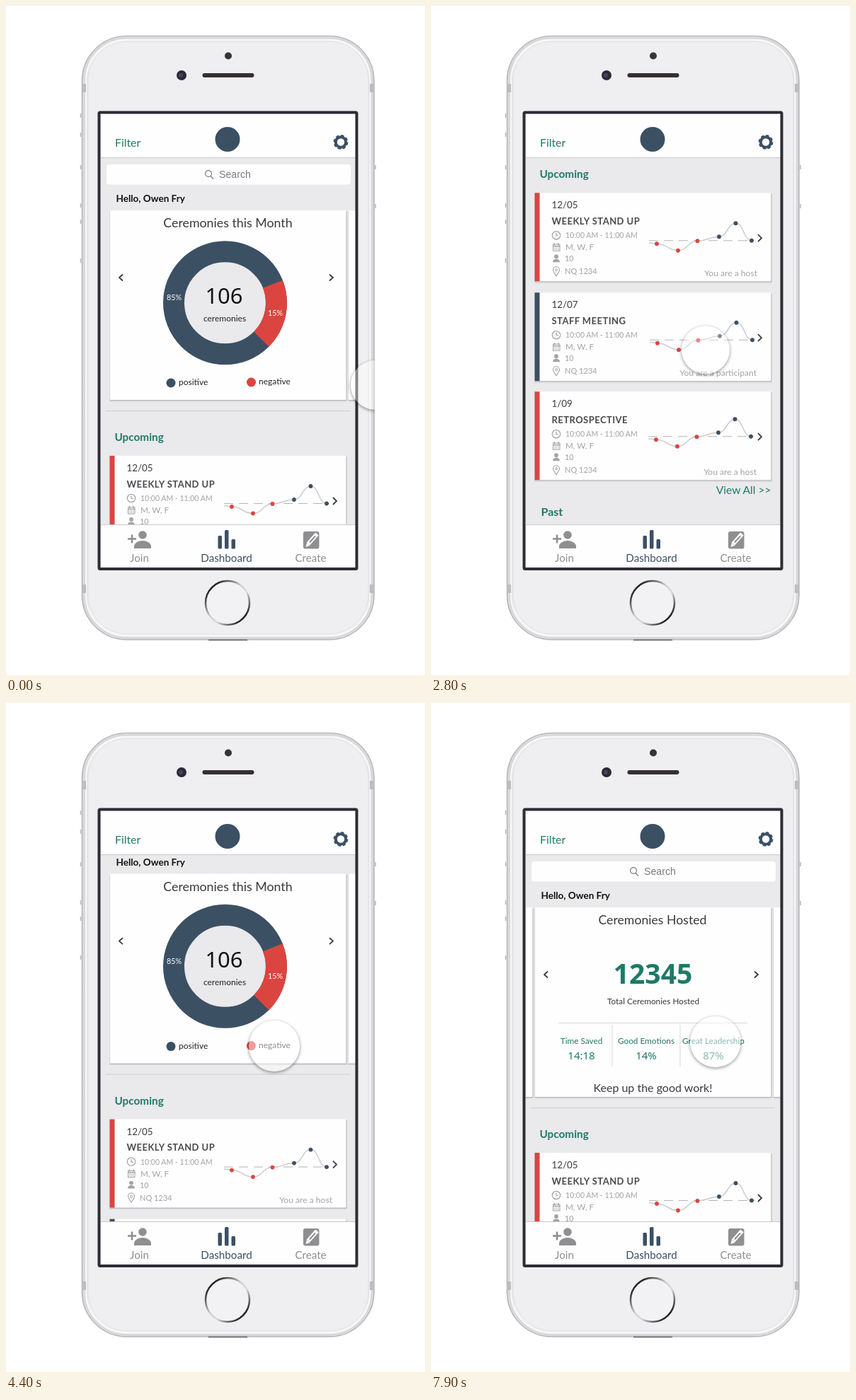
Write an HTML page that moves like this. It is 592 px wide and 946 px high and loops after 8000 ms.

```html
<!DOCTYPE html>
<html lang="en">
<head>
<meta charset="utf-8">
<title>Dashboard scroll</title>
<style>
html, body { margin: 0; width: 100%; height: 100%; overflow: hidden; background: #fff; }
svg { display: block; width: 592px; height: 946px; font-family: Lato, "Open Sans", sans-serif; }
.num { font-family: "Noto Sans", "Open Sans", sans-serif; }
</style>
</head>
<body>
<svg id="stage" viewBox="0 0 592 946" xmlns="http://www.w3.org/2000/svg"></svg>
<script>
const NAVY = '#3c5064', RED = '#db4540', GREEN = '#1d7a66', GREY = '#8f8f92', PALE = '#a3a3a6', INK = '#3a3a3d';
const LOOP = 8000, PAGE = 337;

const text = (x, y, str, size, fill, more = '') =>
  `<text x="${x}" y="${y}" font-size="${size}" fill="${fill}" ${more}>${str}</text>`;
const mid = (x, y, str, size, fill, more = '') => text(x, y, str, size, fill, 'text-anchor="middle" ' + more);
const end = (x, y, str, size, fill) => text(x, y, str, size, fill, 'text-anchor="end"');
const rect = (x, y, w, h, fill, more = '') =>
  `<rect x="${x}" y="${y}" width="${w}" height="${h}" fill="${fill}" ${more}/>`;
const dot = (x, y, r, fill, more = '') => `<circle cx="${x}" cy="${y}" r="${r}" fill="${fill}" ${more}/>`;
const line = (d, stroke, width = 1, more = '') =>
  `<path d="${d}" fill="none" stroke="${stroke}" stroke-width="${width}" ${more}/>`;
const panel = (x, y, w, h) => rect(x - 1, y + 1, w + 2, h + 1.5, '#d6d6d8') +
  rect(x, y + 1, w + 1, h, '#b4b4b7') + rect(x, y, w, h, '#fefefe');
const BOLD = 'font-weight="700"';
const number = weight => `class="num" font-weight="${weight}"`;

function phone() {
  const band = (x, y) => rect(x, y, 6, 12, '#bdbdbf');
  const tick = (x, y) => line(`M${x} ${y}v6`, '#b5b5b5', 1.5);
  return rect(107.5, 42.5, 412.5, 853.5, 'url(#body)', 'rx="63" stroke="#b4b4b6" stroke-width="1.5"') +
    rect(110, 45, 407.5, 848.5, 'none', 'rx="60.5" stroke="#d8d8da" stroke-width="3"') +
    rect(113, 48, 401.5, 842.5, 'none', 'rx="57.5" stroke="#f8f8f9" stroke-width="2"') +
    rect(116, 50, 396, 838, '#efeef0', 'rx="55" stroke="#e2e2e4"') +
    [110, 818].map(y => band(107, y) + band(514, y)).join('') +
    [152, 179, 225, 279, 302, 357].map(y => tick(105.5, y)).join('') +
    [225, 280].map(y => tick(522, y)).join('') +
    dot(314, 70.5, 5, '#383335') + dot(248, 98, 7, '#2b2a33') + dot(247, 98, 3, '#3d4668') +
    rect(277.5, 95, 73, 6, '#352f30', 'rx="3"') +
    dot(313, 844, 31, '#f2f1f3', 'stroke="url(#ring)" stroke-width="2.5"') +
    line('M286 896.5H341', '#77777a', 2);
}

function header() {
  return rect(134, 152, 360, 62, '#fefefe') + line('M134 214.5H494', '#c9c9cb') +
    text(154, 199, 'Filter', 15.8, GREEN) + dot(313, 188.5, 17.5, NAVY) +
    dot(473, 192.5, 7.2, 'none', `stroke="${NAVY}" stroke-width="4"`) +
    dot(473, 192.5, 9.2, 'none', `stroke="${NAVY}" stroke-width="2.4" stroke-dasharray="4.2 3.025"`);
}

function tabs() {
  return rect(134, 733, 360, 62, '#fefefe') + line('M134 733.5H494', '#c9c9cb') +
    line('M172 753.5h12M178 747.5v12', GREY, 2.6) + dot(193, 748, 5.8, GREY) +
    `<path d="M181 767v-3c0-5 7-8 12-8s12 3 12 8v3z" fill="${GREY}"/>` +
    rect(299.5, 749, 5.5, 18.5, NAVY, 'rx="1.5"') + rect(309, 741, 5.5, 26.5, NAVY, 'rx="1.5"') +
    rect(318.5, 754, 5.5, 13.5, NAVY, 'rx="1.5"') +
    rect(420, 743, 22.5, 24.5, GREY, 'rx="3"') +
    line('M427 760.5L439.5 746.5', '#fefefe', 6) + line('M429 758.5L437 749.5', GREY, 2) +
    '<path d="M423.5 765l1.5-6 4.5 4z" fill="#fefefe"/>' +
    mid(188.5, 786, 'Join', 15.2, GREY) + mid(311.5, 786, 'Dashboard', 15.2, NAVY) +
    mid(430.5, 786, 'Create', 15.2, GREY);
}

const arrows = line('M165 379.5L160 384l5 4.5M457 379.5L462 384l-5 4.5', INK, 1.8);

function donutPage() {
  const cx = 309.5, cy = 419.8, r = 72.5, at = deg => {
    const a = deg * Math.PI / 180;
    return `${cx + r * Math.cos(a)} ${cy + r * Math.sin(a)}`;
  };
  return mid(313.5, 313, 'Ceremonies this Month', 17.8, INK) +
    dot(cx, cy, r, '#eae9eb', `stroke="${NAVY}" stroke-width="30"`) +
    line(`M${at(-21.5)}A${r} ${r} 0 0 1 ${at(45)}`, RED, 30) +
    mid(237.5, 416, '85%', 10.8, '#fff') + mid(380.5, 437.5, '15%', 10.8, '#fff') +
    mid(308, 421, '106', 31, '#111', number(500)) + mid(309, 446, 'ceremonies', 12, '#222') +
    dot(233, 533, 6.5, NAVY) + text(244, 536, 'positive', 12, '#222') +
    dot(346.5, 532, 6.5, RED) + text(357, 535, 'negative', 12, '#222');
}

function totalsPage() {
  const stat = (x, label, value) =>
    mid(x, 481.5, label, 11.8, GREEN) + mid(x, 504, value, 15, GREEN, number(500));
  return mid(313, 313, 'Ceremonies Hosted', 17.7, INK) +
    mid(313.5, 397, '12345', 39, GREEN, number(600)) +
    mid(314, 426, 'Total Ceremonies Hosted', 11.8, INK) +
    line('M180 452.5H447M256 455V514M352 455V514', '#d9d9db') +
    stat(212.5, 'Time Saved', '14:18') + stat(304, 'Good Emotions', '14%') +
    stat(399, 'Great Leadership', '87%') +
    mid(313.5, 550, 'Keep up the good work!', 16, INK);
}

function pager() {
  return '<g id="pager">' + [donutPage(), totalsPage(), ''].map((page, i) =>
    `<g transform="translate(${i * PAGE})">${panel(147, 289, 333.5, 268)}${arrows}${page}</g>`).join('') + '</g>';
}

function chart(dx, dy) {
  const pts = [[308, 70.5], [319, 72], [349, 81.5], [376.5, 68], [407, 62], [430.5, 43], [453, 67.5]];
  let d = 'M308 70.5';
  pts.slice(1).forEach(([x, y], i) => {
    const [px, py] = pts[i], m = (px + x) / 2;
    d += `C${m} ${py} ${m} ${y} ${x} ${y}`;
  });
  return `<g transform="translate(${dx} ${dy})">` +
    line('M308 67.5H457', '#b4b4b6', 1, 'stroke-dasharray="13 8"') + line(d, '#cbcccf', 1.5) +
    pts.slice(1).map(([x, y], i) => dot(x, y, 2.9, i < 3 ? RED : NAVY)).join('') + '</g>';
}

const icons =
  dot(177, 60, 5.7, 'none', `stroke="${PALE}" stroke-width="1.2"`) + line('M177 56.5V60.5H180', PALE, 1.2) +
  rect(172.5, 73, 9.5, 9, 'none', `stroke="${PALE}"`) +
  line('M172 75.5H182.5M174.5 71v3M180 71v3', PALE, 1.6) +
  line('M174 78h7M174 80h7', PALE, 1, 'stroke-dasharray="1.5 1"') +
  dot(177, 90, 2.9, PALE) + `<path d="M172 98c0-6 10-6 10 0z" fill="${PALE}"/>` +
  line('M177 117.5C174 113 172.5 111 172.5 109a4.5 4.5 0 0 1 9 0C181.5 111 180 113 177 117.5z', PALE, 1.1) +
  dot(177, 109, 1.5, 'none', `stroke="${PALE}"`);

function meeting(top, date, title, role, color, right, dx, dy) {
  return `<g transform="translate(0 ${top})">` + panel(147, 0, 333.5, 125) + rect(146.5, 0, 7, 125, color) +
    text(170.5, 22, date, 13.4, INK) +
    text(170.5, 44.5, title, 13, '#4a4a4d', BOLD + ' letter-spacing=".45"') + icons +
    text(190, 64, '10:00 AM - 11:00 AM', 10.5, PALE) + text(190, 81, 'M, W, F', 11.7, PALE) +
    text(189, 97, '10', 10.8, PALE) + text(189, 115, 'NQ 1234', 11, PALE) +
    end(right, 118, 'You are a ' + role, 12.1, PALE) + chart(dx, dy) +
    line('M462 59l5 5-5 5', INK, 1.8) + '</g>';
}

function content() {
  return '<g clip-path="url(#view)"><g id="scroll">' +
    rect(142, 224, 345, 28.5, '#fefefe', 'rx="4"') +
    dot(286, 237, 4.4, 'none', 'stroke="#77777a" stroke-width="1.2"') + line('M289 240.5l4 4', '#77777a', 1.3) +
    text(301, 243, 'Search', 14.2, '#7b7b7e', 'font-family="Liberation Sans, sans-serif"') +
    text(155.5, 277, 'Hello, Owen Fry', 13.5, '#111', BOLD) + pager() +
    line('M141 572.5H486', '#cdcdcf') + text(153.5, 615, 'Upcoming', 15.3, GREEN, BOLD) +
    meeting(636, '12/05', 'WEEKLY STAND UP', 'host', RED, 461, 0, 0) +
    meeting(777, '12/07', 'STAFF MEETING', 'participant', NAVY, 460, 1, -.5) +
    meeting(917, '1/09', 'RETROSPECTIVE', 'host', RED, 460, -1, -4) +
    end(480.5, 1062, 'View All &gt;&gt;', 15.6, GREEN) + text(155.5, 1092.5, 'Past', 16, GREEN, BOLD) +
    meeting(1105, '12/05', 'WEEKLY STAND UP', 'host', RED, 456, -1, 0) + '</g></g>';
}

document.getElementById('stage').innerHTML = `<defs>
  <linearGradient id="body"><stop stop-color="#d4d4d6"/><stop offset=".03" stop-color="#f1f0f2"/>
    <stop offset=".97" stop-color="#f1f0f2"/><stop offset="1" stop-color="#d4d4d6"/></linearGradient>
  <linearGradient id="ring" x2="1" y2="1"><stop offset=".15" stop-color="#222224"/><stop offset=".45" stop-color="#d0d0d2"/>
    <stop offset=".6" stop-color="#d8d8da"/><stop offset=".85" stop-color="#222224"/></linearGradient>
  <clipPath id="view"><rect x="134" y="215" width="360" height="518"/></clipPath>
  <clipPath id="edge"><rect x="107" y="42" width="413.5" height="854"/></clipPath>
  <filter id="soft" x="-30%" y="-30%" width="160%" height="160%"><feGaussianBlur stdDeviation="2"/></filter>
  <mask id="rim"><rect x="-60" y="-60" width="120" height="120" fill="#fff"/><circle r="35" fill="#000"/></mask>
  </defs>` + phone() + rect(134, 152, 360, 643, '#eae9eb') + content() + header() + tabs() +
  rect(131.5, 150.5, 364, 645.5, 'none', 'rx="1.5" stroke="#2c2d35" stroke-width="4"') +
  `<g clip-path="url(#edge)"><g id="touch">
    <g mask="url(#rim)"><circle cy="1.5" r="35.5" fill="#000" opacity=".36" filter="url(#soft)"/></g>
    <circle id="pad" r="35" fill="#fff"/></g></g>`;

const [scroller, pages, touch, pad] = ['scroll', 'pager', 'touch', 'pad'].map(id => document.getElementById(id));

// Each key: time, then values; eased in and out between keys.
const scrollKeys = [[1140, 0], [1900, 362], [2700, 362], [3400, 535], [3600, 535], [4581, 0]];
const pageKeys = [[6300, 0], [6724, PAGE]];
// Values: x, y, radius; the pad shrinks while it presses.
const touchKeys = [
  [0, 522, 536, 35], [900, 399, 612, 36], [1140, 397, 612, 34], [1900, 387, 258, 34], [2050, 387, 255, 36],
  [2600, 388, 496, 36], [2700, 388, 496, 34], [3400, 388, 323, 34], [3480, 388, 323, 36], [3550, 388, 323, 36],
  [3650, 388, 323, 34], [4250, 380, 478, 34], [4400, 379, 485, 36], [4600, 381, 488, 36], [5400, 468, 490, 36],
  [6200, 403, 483, 36], [6290, 400, 482, 34], [6400, 352, 482, 34], [6650, 240, 482, 34], [6800, 234, 482, 36],
  [7200, 234, 482, 36], [7900, 402, 479, 36]
];

function sample(keys, t) {
  const i = keys.findIndex(k => k[0] > t);
  if (i < 0) return keys[keys.length - 1].slice(1);
  if (i === 0) return keys[0].slice(1);
  const a = keys[i - 1], b = keys[i], u = (t - a[0]) / (b[0] - a[0]), e = u * u * (3 - 2 * u);
  return a.slice(1).map((v, n) => v + (b[n + 1] - v) * e);
}

function frame(now) {
  const t = now % LOOP, [x, y, r] = sample(touchKeys, t);
  scroller.setAttribute('transform', `translate(0 ${-sample(scrollKeys, t)[0]})`);
  pages.setAttribute('transform', `translate(${-sample(pageKeys, t)[0]})`);
  touch.setAttribute('transform', `translate(${x} ${y}) scale(${r / 35})`);
  pad.setAttribute('opacity', .48 - (36 - r) * .06);
  requestAnimationFrame(frame);
}
requestAnimationFrame(frame);
</script>
</body>
</html>
```
